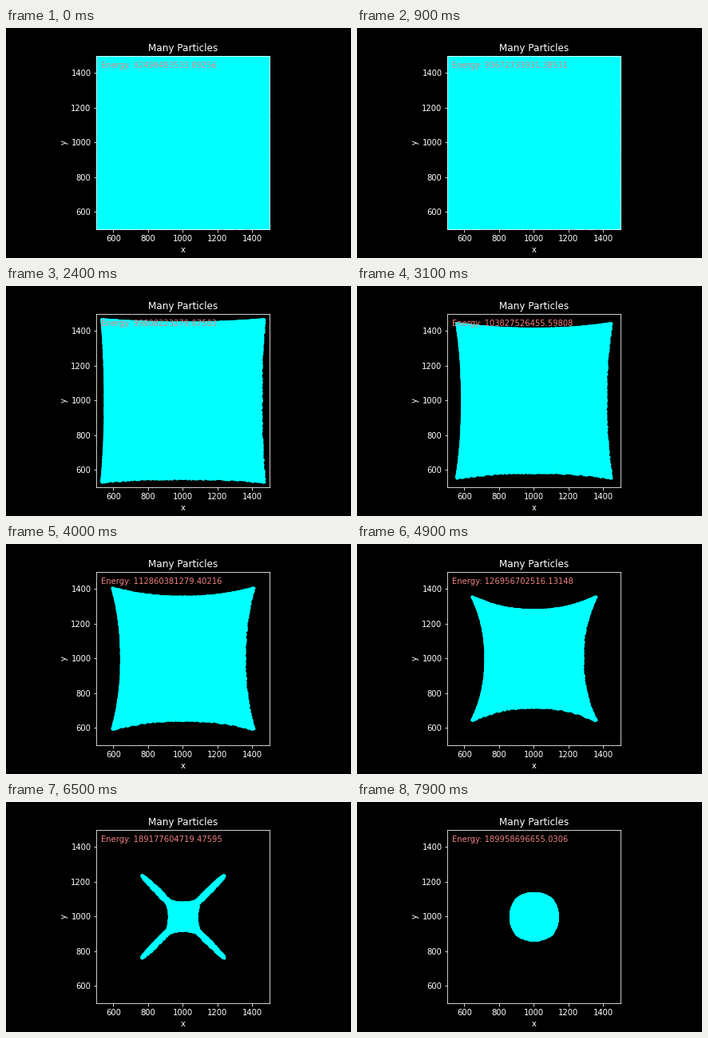
Recreate the animation shown at these times as a matplotlib script. Size 432 by 288 pixels, loop 8 s.

```python
import numpy as np
import matplotlib.pyplot as plt
from matplotlib.animation import FuncAnimation
from matplotlib.patches import Polygon

FRAMES, STEP = 80, 100
CYAN = "#00ffff"
CENTER = 1000
S = np.linspace(0, 1, 25)

plt.style.use("dark_background")
plt.rcParams.update({"font.family": "DejaVu Sans", "font.size": 10})

# Energy readings at key times (seconds)
TIMES = np.array([0, 1.6, 3.1, 4.0, 4.9, 6.5, 7.2, 7.9])
ENERGY = np.array([92498493533.89256, 95367752717.2472, 103827526455.59808,
                   112860381279.40216, 126956702516.13148, 189177604719.47595,
                   2.25e11, 189958696655.0306])
SLOPES = np.gradient(ENERGY, TIMES)


def energy(t):
    """Cubic Hermite curve through the readings."""
    i = min(np.searchsorted(TIMES, t, "right") - 1, len(TIMES) - 2)
    h = TIMES[i + 1] - TIMES[i]
    s = (t - TIMES[i]) / h
    return float(ENERGY[i] * (1 + 2 * s) * (1 - s) ** 2
                 + ENERGY[i + 1] * s * s * (3 - 2 * s)
                 + h * s * (1 - s) * (SLOPES[i] * (1 - s) - SLOPES[i + 1] * s))


def eighth(t):
    """Outline from the middle of the top side to the corner."""
    corner = 500 - t ** 2 * (5.4 + .13 * t)
    fall = 500 - 9.1 * t ** 2 - 1.2e-5 * t ** 8
    side = max(fall, 45, 110 * (t - 6.7))  # falls in, passes through, expands
    x = S * corner
    arm = x + 15 * np.sqrt(np.abs(np.sin(np.pi * S)))
    return np.column_stack([x, np.maximum(side + (corner - side) * S ** 2.2, arm)])


def outline(t):
    part = eighth(t)
    quarter = np.vstack([part, part[-2:0:-1, ::-1]])
    sides = []
    for _ in range(4):
        sides.append(quarter)
        quarter = np.column_stack([quarter[:, 1], -quarter[:, 0]])
    return np.vstack(sides)


# Rim particles keep their place along the outline and a small inward offset.
rng = np.random.default_rng(4)
count = 8 * (len(S) - 1)
tips = np.arange(1, 8, 2) * (len(S) - 1)
where = np.append(rng.uniform(0, count, 600), tips)
inset = 1 - np.append(rng.uniform(0, .005, 600), np.zeros(4))


def rim(points):
    ring = np.vstack([points, points[:1]])
    k = np.arange(count + 1)
    return np.column_stack([np.interp(where, k, axis) * inset for axis in ring.T])


fig = plt.figure(figsize=(6, 4), dpi=72)
fig.subplots_adjust(left=.125, right=.9, bottom=.125, top=.88)
ax = fig.add_subplot()
ax.set_aspect("equal")
ticks = range(600, 1401, 200)
ax.set(xlim=(500, 1500), ylim=(500, 1500), title="Many Particles",
       xlabel="x", ylabel="y", xticks=ticks, yticks=ticks)
ax.tick_params(axis="y", pad=2.6)

body = ax.add_patch(Polygon(outline(0) + CENTER, closed=True, fc=CYAN, ec=CYAN,
                            lw=3.2, joinstyle="round"))
dots = ax.scatter([], [], s=16, c=CYAN, linewidths=0)
label = ax.text(.03, .93, "", color="lightcoral", transform=ax.transAxes)


def draw(i):
    t = i * STEP / 1000
    points = outline(t)
    body.set_xy(points + CENTER)
    dots.set_offsets(rim(points) + CENTER)
    label.set_text(f"Energy: {energy(t)}")
    return body, dots, label


anim = FuncAnimation(fig, draw, frames=FRAMES, interval=STEP,
                     repeat=True, repeat_delay=0)
plt.show()
```
